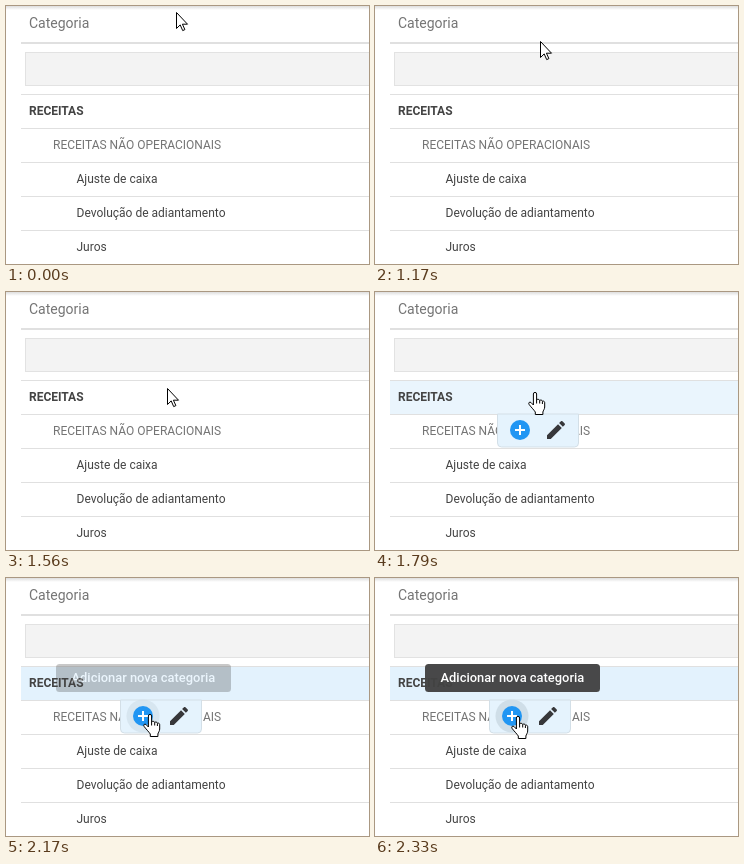
Recreate the animation shown at these times as an HTML page. Size 363x258 px, loop 3500 ms.

```html
<!DOCTYPE html>
<html lang="pt">
<head>
<meta charset="utf-8">
<style>
  html, body { margin: 0; width: 100%; height: 100%; overflow: hidden; background: #fff; }
  svg { display: block; width: 363px; height: 258px; }
  text { font: 12px Roboto, sans-serif; fill: #444; }
  .muted { fill: #757575; }
  .pointer { fill: #fff; stroke: #000; stroke-linejoin: round; }
</style>
</head>
<body>
<svg viewBox="0 0 363 258">
  <defs>
    <linearGradient id="shade" x2="0" y2="1">
      <stop stop-color="#dedede"/><stop offset="1" stop-color="#fff"/>
    </linearGradient>
  </defs>
  <rect width="363" height="4" fill="url(#shade)"/>
  <rect id="row" x="15" y="88" width="348" height="34" fill="#e3f2fd"/>
  <path d="M15 37H363" stroke="#e0e0e0" stroke-width="2"/>
  <path d="M15 88.5H363m-348 34H363m-348 34H363m-348 34H363m-348 34H363" stroke="#e0e0e0"/>
  <rect x="19.5" y="46.5" width="350" height="33" fill="#f3f3f3" stroke="#e2e2e2"/>
  <text class="muted" x="23" y="22" style="font-size:14px">Categoria</text>
  <text x="23" y="109" style="font-weight:700">RECEITAS</text>
  <text class="muted" x="47" y="143">RECEITAS NÃO OPERACIONAIS</text>
  <text x="70.5" y="177">Ajuste de caixa</text>
  <text x="70.5" y="211">Devolução de adiantamento</text>
  <text x="70.5" y="245">Juros</text>

  <g id="menu">
    <path d="M.5 0V29a4 4 0 0 0 4 4h73a4 4 0 0 0 4-4V0z" fill="#e5f3fd" stroke="#d3dfe7"/>
    <circle id="halo" cx="23" cy="16" r="16.5" fill="#cfdee8"/>
    <circle cx="23" cy="16" r="10" fill="#2196f3"/>
    <path d="M18 16h10M23 11v10" stroke="#fff" stroke-width="2"/>
    <path transform="translate(47 4)" fill="#37373a" d="M3 17.25V21h3.75L17.8 9.95 14.05 6.2zM20.7 7c.4-.4.4-1 0-1.4l-2.3-2.3c-.4-.4-1-.4-1.4 0l-1.9 1.8 3.75 3.75z"/>
  </g>

  <g id="tip">
    <rect x="50" y="86" width="175" height="28" rx="3.5" fill="#424242" fill-opacity=".96"/>
    <text x="65.5" y="104" style="font-size:12.9px;font-weight:500;fill:#fff">Adicionar nova categoria</text>
  </g>

  <path id="arrow" class="pointer" d="M.5.5v16l3.7-3.6 2.5 5.7 2.2-1-2.5-5.4h5.1z"/>
  <g id="hand" class="pointer">
    <path d="M-1.6 13V2a1.6 1.6 0 0 1 3.2 0V8c.4-1.100 2.9-.9 3.1.5.7-.8 2.6-.5 2.7.8.8-.6 2.3 0 2.3 1.3V15c0 2-1.5 3.5-1.8 5v2.5H.3V20C-1 18-4.5 14.500-6 12.300c-.9-1.600.7-2.900 2.100-1.700z"/>
    <path d="M1.6 8v3.5m3.1-3v3m2.7-2v2.5" fill="none"/>
  </g>
</svg>
<script>
// The picture advances in equal steps, resting before the first and after the last.
const LOOP = 3500, START = 844, STEP = 78, LAST = 19;
const HOVER = 10, MENU = 11, LEAVE = 14;

const linear = p => p;
const easeIn = p => p ** 2;
const easeOut = p => 1 - (1 - p) ** 2.5;

// Pointer stops, each with the easing that leads to the next one.
const stops = [
  { at: -1, x: 170, y: 6, ease: linear },
  { at: 0, x: 170, y: 12, ease: easeIn },
  { at: 6, x: 158, y: 64, ease: linear },
  { at: 7, x: 162, y: 86, ease: easeOut },
  { at: 12, x: 160, y: 100, ease: linear },
  { at: LEAVE, x: 152, y: 123, ease: easeOut },
  { at: LAST, x: 143, y: 138 }
];

const [row, menu, halo, tip, arrow, hand] =
  ['row', 'menu', 'halo', 'tip', 'arrow', 'hand'].map(id => document.getElementById(id));
const clamp = (v, low, high) => Math.min(high, Math.max(low, v));
const ramp = (step, start, length) => clamp((step - start) / length, 0, 1);
const place = (node, x, y) => node.setAttribute('transform', `translate(${x} ${y})`);
const show = (node, opacity) => node.setAttribute('opacity', Number(opacity));

function pointerAt(step) {
  const next = Math.max(1, stops.findIndex(s => s.at >= step));
  const a = stops[next - 1], b = stops[next];
  const p = a.ease((step - a.at) / (b.at - a.at));
  return [a.x + (b.x - a.x) * p, a.y + (b.y - a.y) * p].map(Math.round);
}

function draw(now) {
  const step = clamp(Math.floor((now % LOOP - START) / STEP), -1, LAST);
  const pointer = pointerAt(step);
  place(arrow, ...pointer);
  place(hand, ...pointer);
  show(arrow, step < HOVER);
  show(hand, step >= HOVER);
  show(row, ramp(step, HOVER - 1, 4));
  // The menu follows the pointer sideways until it leaves the row.
  place(menu, pointerAt(Math.min(step, LEAVE))[0] - 38, 122);
  show(menu, step >= MENU);
  show(halo, ramp(step, LEAVE, 5));
  show(tip, ramp(step, 16.4, 2));
  requestAnimationFrame(draw);
}
requestAnimationFrame(draw);
</script>
</body>
</html>
```
